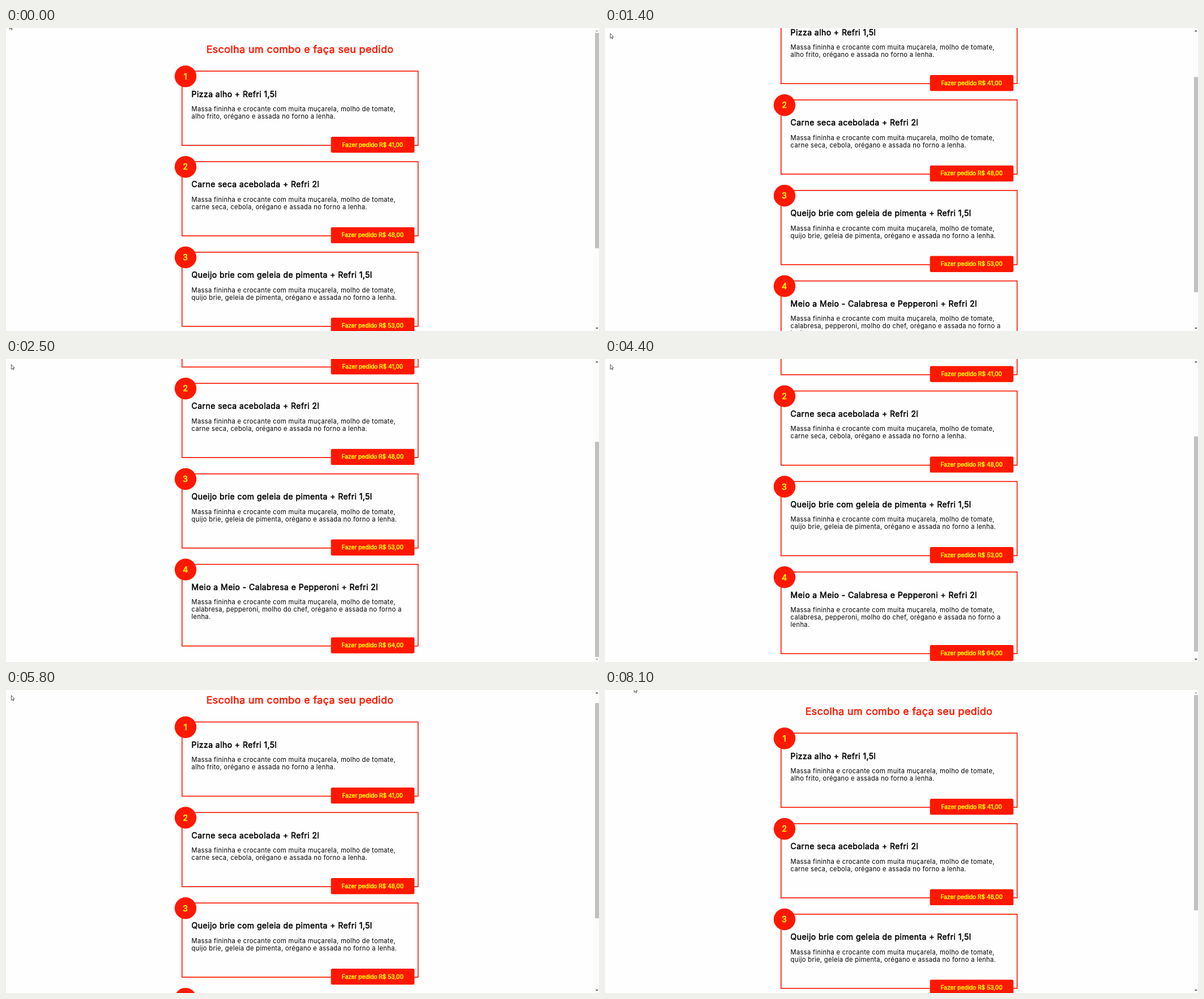
Write an HTML page that moves like this. It is 1047 px wide and 535 px high and loops after 8.4 s.

```html
<!DOCTYPE html>
<html lang="pt-BR">
<head>
<meta charset="utf-8">
<title>Escolha um combo</title>
<style>
  html, body { margin: 0; width: 100%; height: 100%; overflow: hidden; background: #fefefe; }
  svg { display: block; width: 1047px; height: 535px; }
  text { font-family: Inter, "Open Sans", sans-serif; font-optical-sizing: none; letter-spacing: .028em; }
  .title, .name, .num, .buy { stroke: currentColor; fill: currentColor; }
  .title { font-size: 17.8px; color: #ff1800; stroke-width: .6px; letter-spacing: .026em; }
  .name { font-size: 14.1px; color: #000; stroke-width: .5px; }
  .desc { font-size: 11.2px; fill: #000; }
  .num { font-size: 14.5px; color: #ff0; stroke-width: .6px; }
  .buy { font-size: 10px; color: #ff0; stroke-width: .5px; letter-spacing: .008em; }
  .mid { text-anchor: middle; }
  .frame { fill: none; stroke: #ff1800; stroke-width: 1.65px; }
  .red { fill: #ff1800; }
</style>
</head>
<body>
<svg viewBox="0 0 1047 535">
  <g id="page"><text class="title mid" x="519" y="44">Escolha um combo e faça seu pedido</text></g>
  <rect x="1038" width="9" height="535" fill="#fcfcfc"/>
  <rect id="thumb" x="1040" y="9" width="7" height="380" fill="#c1c1c1"/>
  <path id="up" d="M1040.8 6.2h5l-2.5-2.7z"/>
  <path id="down" d="M1040.8 529h5l-2.5 2.7z"/>
  <path id="cursor" d="M.4 .6V9.2L2.4 7.4 3.7 10.2 4.9 9.7 3.7 6.9H6.2z" fill="#fff" stroke="#222" stroke-width=".75"/>
</svg>
<script>
const LOOP = 8400, STEP = 100, MAX = 193, PITCH = 159.8, LINE = 13.1;
const $ = id => document.getElementById(id);
const base = "Massa fininha e crocante com muita muçarela, molho de tomate,";
const combos = [
  ["Pizza alho + Refri 1,5l", "41,00", "alho frito, orégano e assada no forno a lenha."],
  ["Carne seca acebolada + Refri 2l", "48,00", "carne seca, cebola, orégano e assada no forno a lenha."],
  ["Queijo brie com geleia de pimenta + Refri 1,5l", "53,00", "quijo brie, geleia de pimenta, orégano e assada no forno a lenha."],
  ["Meio a Meio - Calabresa e Pepperoni + Refri 2l", "64,00", "calabresa, pepperoni, molho do chef, orégano e assada no forno a", "lenha."]
];

function add(parent, tag, attrs, text = "") {
  const el = document.createElementNS("http://www.w3.org/2000/svg", tag);
  for (const k in attrs) el.setAttribute(k, attrs[k]);
  el.textContent = text;
  parent.append(el);
}

combos.forEach(([name, price, ...rest], i) => {
  const extra = (rest.length - 1) * LINE;
  add($("page"), "g", { transform: `translate(0 ${75.4 + i * PITCH})` });
  const card = $("page").lastChild;
  add(card, "rect", { class: "frame", x: 310.8, y: .8, width: 416.8, height: 131 + extra });
  add(card, "circle", { class: "red", cx: 317, cy: 10, r: 19.2 });
  add(card, "text", { class: "num mid", x: 316.8, y: 15.3 }, i + 1);
  add(card, "text", { class: "name", x: 327.6, y: 46.2 }, name);
  [base, ...rest].forEach((line, n) =>
    add(card, "text", { class: "desc", x: 327.6, y: 71.5 + n * LINE }, line));
  add(card, "rect", { class: "red", x: 573.7, y: 116.6 + extra, width: 147.5, height: 28.3, rx: 2.7 });
  add(card, "text", { class: "buy mid", x: 647.3, y: 134.3 + extra }, "Fazer pedido R$ " + price);
});

const part = (t, from, span) => Math.min(1, Math.max(0, (t - from) / span));
const smooth = u => u ** 1.86 / (u ** 1.86 + (1 - u) ** 1.86);
const drag = u => u ** 1.2;

// Each wheel gesture adds its eased distance.
const scrollAt = t =>
  109 * smooth(part(t, 1000, 400)) +
  84 * smooth(part(t, 1900, 400)) -
  164 * drag(part(t, 4300, 800)) -
  29 * smooth(part(t, 5700, 250));

// The pointer drops in, rests, then swings out to the right and back off the top.
function pointerAt(t) {
  const enter = part(t, 300, 200), leave = part(t, 7400, 700);
  const arc = 4 * leave * (1 - leave);
  return [6 + 3 * enter + 42 * leave + 490 * arc, -7 + 16 * enter - 14 * leave + 147 * arc];
}

function draw(now) {
  const t = Math.floor(now % LOOP / STEP) * STEP;
  const y = scrollAt(t);
  const shade = active => active ? "#505050" : "#a8a8a8";
  $("page").setAttribute("transform", `translate(0 ${-y})`);
  $("thumb").setAttribute("y", 9 + y * .711);
  $("up").setAttribute("fill", shade(y > 0));
  $("down").setAttribute("fill", shade(y < MAX));
  $("cursor").setAttribute("transform", `translate(${pointerAt(t)})`);
}

const start = performance.now();
function tick() {
  draw(performance.now() - start);
  requestAnimationFrame(tick);
}
tick();
</script>
</body>
</html>
```
